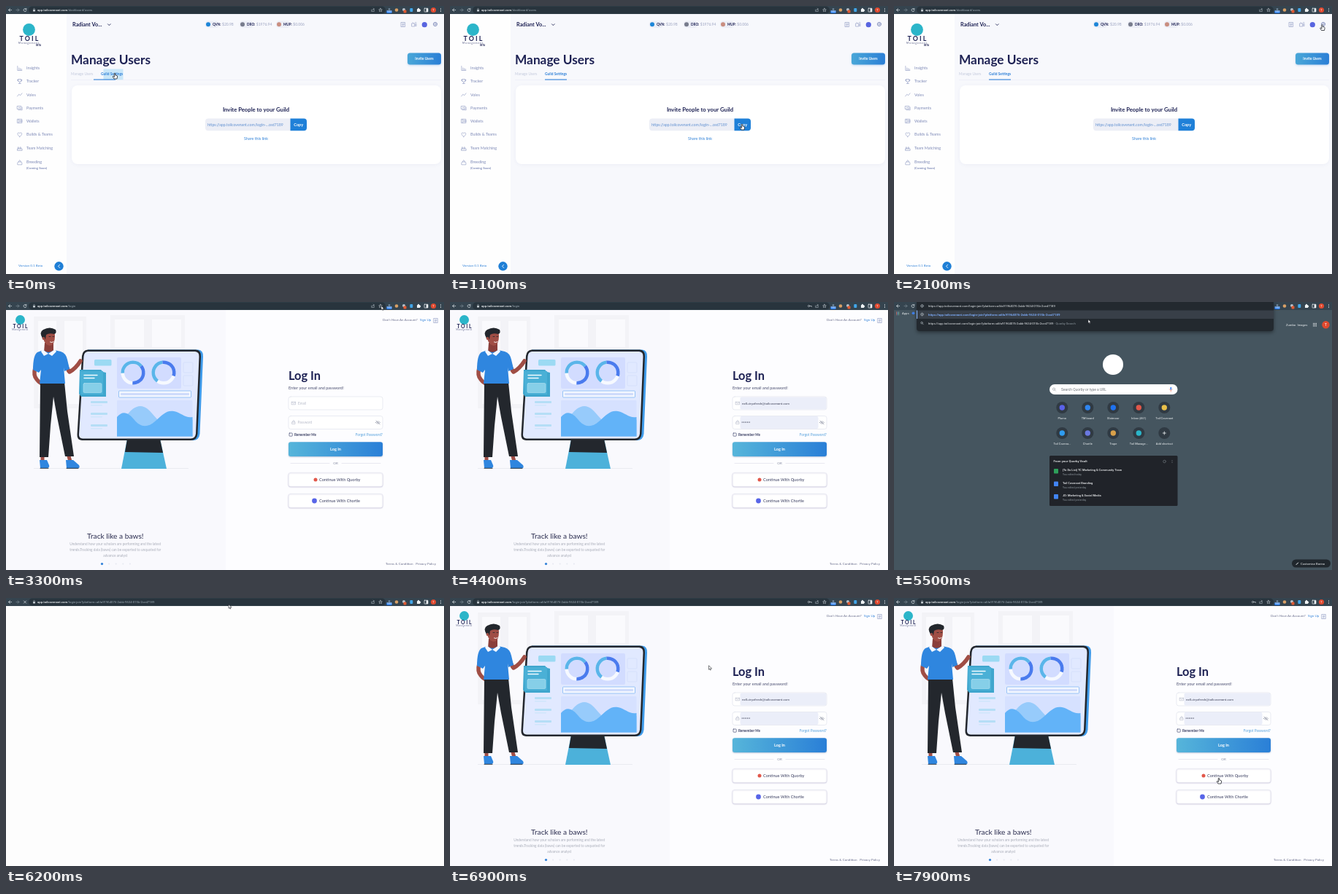
Write an HTML page with a canvas that moves like this. It is 600 px wide and 368 px high and loops after 8 s.

```html
<!DOCTYPE html>
<html lang="en">
<head>
<meta charset="utf-8">
<title>Guild invite walkthrough</title>
<style>
html, body { margin: 0; width: 100%; height: 100%; overflow: hidden; background: #fdfdff; }
canvas { display: block; width: 600px; height: 368px; }
</style>
</head>
<body>
<canvas id="stage"></canvas>
<script>
const LOOP = 8000;
const NAVY = '#1e2254', BLUE = '#2f80d8', MUTED = '#8a95c0', TEAL = '#2bb5c9';
const UI = 'Lato, sans-serif', SYS = 'Roboto, sans-serif';
const HOST = 'app.toilcovenant.com';
const JOIN = '/login-join?platform=a6fa91964076-2abb-9634-015b-2ced7189';
const cv = document.getElementById('stage');
const c = cv.getContext('2d');
const dpr = Math.max(1, window.devicePixelRatio || 1);
cv.width = 600 * dpr;
cv.height = 368 * dpr;

// ---- helpers ----
function box(x, y, w, h, r, fill, line, lw = 0.6) {
  c.beginPath();
  c.roundRect(x, y, w, h, r);
  if (fill) { c.fillStyle = fill; c.fill(); }
  if (line) { c.strokeStyle = line; c.lineWidth = lw; c.stroke(); }
}
function dot(x, y, r, fill, line, lw = 0.6) {
  c.beginPath();
  c.arc(x, y, r, 0, 7);
  if (fill) { c.fillStyle = fill; c.fill(); }
  if (line) { c.strokeStyle = line; c.lineWidth = lw; c.stroke(); }
}
function shape(d, fill) { c.fillStyle = fill; c.fill(new Path2D(d)); }
function line(d, color, lw = 0.7) {
  c.strokeStyle = color;
  c.lineWidth = lw;
  c.lineCap = c.lineJoin = 'round';
  c.stroke(new Path2D(d));
}
function icon(d, x, y, color, lw) {
  c.save();
  c.translate(x, y);
  line(d, color, lw);
  c.restore();
}
function text(s, x, y, size, color, weight = 400, align = 'left', font = UI) {
  c.font = `${weight} ${size}px ${font}`;
  c.fillStyle = color;
  c.textAlign = align;
  c.textBaseline = 'middle';
  c.fillText(s, x, y);
  return c.measureText(s).width;
}
const sys = (s, x, y, size, color, weight, align) => text(s, x, y, size, color, weight, align, SYS);
function gradient(x0, x1, a, b) {
  const g = c.createLinearGradient(x0, 0, x1, 0);
  g.addColorStop(0, a);
  g.addColorStop(1, b);
  return g;
}
function shadowed(color, blur, dy, draw) {
  c.save();
  c.shadowColor = color;
  c.shadowBlur = blur * dpr;
  c.shadowOffsetY = dy * dpr;
  draw();
  c.restore();
}
const clamp = v => Math.min(1, Math.max(0, v));
const ease = v => v * v * (3 - 2 * v);

// ---- icons, centred on 0,0 ----
const DOC = 'M-2.6-3H2.6V3H-2.6ZM-1.2-1.2H1.2M-1.2 .2H1.2M-1.2 1.5H.5';
const SIDE = [
  ['Insights', 85.5, 'M-3-3V3H3M-1 2V-.5M.8 2V.3M2.5 2V1'],
  ['Tracker', 103.5, 'M-2-3H2V-.5Q0 2.5-2-.5ZM-2-2H-3.2Q-3 0-1.6 0M2-2H3.2Q3 0 1.6 0M0 1V3M-1.5 3H1.5'],
  ['Voles', 122, 'M-3.2 2L-1-.8L.8 .8L3.2-2.2'],
  ['Payments', 140, 'M-3.2-2.5H2V1.5H-3.2ZM-2 2.8H3.3V-1M-1.5-.5H.5'],
  ['Wallets', 158, 'M-3-2.6H3V2.6H-3ZM.5-.8H3V.8H.5ZM-1.5-2.6V2.6'],
  ['Builds & Teams', 176.5, 'M0 3C-5-.5-2.6-4 0-1.8C2.6-4 5-.5 0 3Z'],
  ['Team Matching', 195.5, 'M-3.3 2.5V.6H3.3V2.5ZM-2-1.6A1 1 0 1 0-1.9-1.6M1-1.6A1 1 0 1 0 1.1-1.6'],
  ['Breeding', 214.5, 'M-3 3V1Q-3-.5-1-.5H1Q3-.5 3 1V3ZM-1.5-.5Q0-5.5 1.5-.5']
];

// ---- browser bar ----
function toolbar(path, opts) {
  box(0, 0, 600, 11, 0, '#35444f');
  box(31, 0.5, 489, 10, 5, '#28343d');
  const pale = '#dfe5ea';
  icon('M2 0H-2L0-2M-2 0L0 2', 5.5, 5.5, pale);
  icon('M-2 0H2L0-2M2 0L0 2', 16, 5.5, '#7c8a94');
  icon(opts.loading ? 'M-1.6-1.6L1.6 1.6M1.6-1.6L-1.6 1.6' : 'M1.6-1.2A2 2 0 1 0 2 .5M1.9-2.2V-.9H.6', 26, 5.5, pale);
  if (path) {
    box(37, 5, 3, 2.4, 0.4, '#c4ccd2');
    line('M37.6 5V4.3A.9 .9 0 0 1 39.4 4.3V5', '#c4ccd2', 0.5);
    const w = sys(HOST, 43, 5.8, 4.25, '#f2f5f7', 500);
    sys(path, 43 + w, 5.8, 4.25, '#9eabb4');
  }
  if (opts.key) { dot(491.5, 5.5, 1.1, null, pale); line('M492.6 5.5H495.3V6.5', pale, 0.6); }
  icon('M-1.8-.5V2H1.8V-.5M-.8 .5Q-.5-1.4 1.8-1.4L.7-2.5M1.8-1.4L.7-.4', 502.5, 5.5, '#b8c2ca', 0.5);
  icon('M0-2.3L.7-.7L2.3-.6L1.1 .5L1.5 2.1L0 1.2L-1.5 2.1L-1.1 .5L-2.3-.6L-.7-.7Z', 513, 5.5, '#dfe5ea', 0.5);
  dot(525, 4.5, 1.4, '#6c8398');
  box(521.3, 6.2, 7.4, 3.8, 1, '#1a73e8');
  sys('1883', 525, 8.3, 3, '#fff', 500, 'center');
  dot(535, 5.5, 2.3, '#d9a066');
  dot(545, 5, 2, '#b9c3cc');
  box(544.5, 5.5, 4, 4, 1, '#e05a33');
  box(553.3, 3, 4, 5, 1, '#42a5e8');
  box(563, 4, 4.2, 4, 0.6, '#eef2f4');
  dot(565, 3.8, 1, '#eef2f4');
  dot(567.3, 6, 0.9, '#eef2f4');
  box(573, 3.2, 5, 4.8, 0.5, null, '#eef2f4', 0.7);
  box(575.7, 3.2, 2.3, 4.8, 0, '#eef2f4');
  dot(585.5, 5.5, 3.6, '#e0492f');
  sys('T', 585.5, 5.8, 4, '#fff', 400, 'center');
  for (let i = -1; i < 2; i++) dot(595.5, 5.5 + i * 1.9, 0.55, pale);
}

function brand(x, y, k, beta) {
  dot(x, y, 8.4 * k, TEAL);
  c.save();
  c.letterSpacing = 2.2 * k + 'px';
  text('TOIL', x + k, y + 12.4 * k, 8.8 * k, NAVY, 700, 'center');
  c.letterSpacing = 0.8 * k + 'px';
  text('Management', x, y + 18 * k, 3.7 * k, '#5a6088', 400, 'center');
  c.restore();
  if (beta) text('BETA', 48, y + 21.5, 2.9, NAVY, 700, 'right');
}

// ---- guild settings page ----
function guildPage(t) {
  box(0, 11, 600, 357, 0, '#f7f8fc');
  box(0, 11, 83, 357, 0, '#fefefe');
  brand(31.5, 32.5, 1, true);
  for (const [label, y, d] of SIDE) {
    icon(d, 18.8, y, MUTED, 0.6);
    text(label, 28, y + 0.3, 5.4, '#7f8bb8');
  }
  text('(Coming Soon)', 28, 222.3, 4.4, '#7f8bb8', 700);
  text('Version 0.1 Beta', 17, 357, 4.6, BLUE);
  dot(72.5, 357.3, 6.2, '#1f7fd6');
  line('M73.6 355.2L71.5 357.3L73.6 359.4', '#fff', 0.9);

  text('Radiant Vo...', 91, 25.3, 7.3, NAVY, 700);
  line('M139.5 24.8L141.3 26.6L143.1 24.8', NAVY, 0.9);
  const coins = [[277, 'QVN:', '$20.98', '#1d86d8'], [324, 'DRO:', '$1976.94', '#777c8c'], [374, 'MUP:', '$0.006', '#c98e80']];
  for (const [x, name, price, tone] of coins) {
    box(x - 4.5, 20.5, 20, 9.5, 4.7, '#eceef6');
    dot(x, 25.2, 3, tone);
    const w = text(name, x + 6, 25.4, 4.6, NAVY, 700);
    text(price, x + 7.5 + w, 25.4, 5, '#9aa2c0');
  }
  icon(DOC, 544, 25.5, MUTED, 0.6);
  icon('M-3-1.5H1V2.5H-3ZM1 0L3-1.2V2.2L1 1.2M-2-3L-.8-1.8M1.5-2.8H3', 559, 25.5, MUTED, 0.6);
  dot(573.3, 25.7, 3.6, '#5865e0');
  dot(588, 25, 1.1, null, MUTED, 0.7);
  dot(588, 25, 2.6, null, MUTED, 1);

  text('Manage Users', 89, 75.2, 17.3, NAVY, 700);
  shadowed('rgba(60,130,210,.3)', 3, 1, () => box(550, 64.5, 46, 16, 3.5, gradient(550, 596, '#49a7d8', '#2b7fd6')));
  text('Invite Users', 573, 72.8, 4.8, '#fff', 700, 'center');
  const glow = 1 - clamp((t - 100) / 350);
  if (glow > 0) {
    c.globalAlpha = glow;
    box(133.5, 86.5, 27, 15, 0, '#c9e6f8');
    c.globalAlpha = 1;
  }
  text('Manage Users', 89, 93.8, 4.9, '#c3c9dc');
  text('Guild Settings', 130, 93.8, 4.9, BLUE, 700);
  box(89, 101.2, 507, 0.5, 0, '#e9ecf5');
  box(120 + 10 * ease(clamp(t / 200)), 100.5, 30, 1.1, 0, BLUE);

  shadowed('rgba(70,90,160,.06)', 5, 1, () => box(90, 109, 506, 108, 8, '#fff'));
  text('Invite People to your Guild', 342.5, 143, 7.7, NAVY, 700, 'center');
  box(273, 154.5, 120, 16.7, 4, '#eceef6');
  text('https://' + HOST + '/login-...ced7189', 276, 163, 5.2, '#5f8fd0');
  box(389.5, 154.5, 22.5, 16.7, [0, 4, 4, 0], '#1f80d8');
  text('Copy', 400.7, 163, 5.5, '#fff', 700, 'center');
  text('Share this link', 342.5, 182.3, 5.4, BLUE, 400, 'center');
}

// ---- login page ----
// ring with a light blue part a..b, a blue part b..d, and white for the rest
function donut(x, y, a, b, d) {
  c.lineCap = 'butt';
  c.lineWidth = 4.6;
  for (const [from, to, tone] of [[0, 6.283, '#f6f9ff'], [a, b, '#5ab5ea'], [b, d, '#4a7bee']]) {
    c.beginPath();
    c.arc(x, y, 14.3, from, to);
    c.strokeStyle = tone;
    c.stroke();
  }
}

function artwork() {
  const skin = '#a04e45', dark = '#23272d', shirt = '#2f86df';
  // wall
  for (const [x, y, w, h] of [[38, 20, 72, 126], [143, 18, 102, 50]]) {
    box(x, y, w, h, 0, '#f3f3f7');
    for (const k of [0, 1]) box(x + 6 + k * w / 2, y + 6, w / 2 - 11, h - 12, 0, '#fafafd');
  }
  box(38, 228.3, 212, 0.8, 0, '#e6e7ee');

  // stand
  shape('M166 188H211L220 229H158Z', '#4cb1da');
  shape('M166 188H211L215 207L163 206Z', dark);
  // monitor
  shape('M112 65.5H263Q270.5 66 270 75L265.5 181Q264.5 190 256 190H106Z', '#3f9bea');
  shape('M112 65.5H260Q267.5 66 267 75L262.5 181Q261.5 190 253 190H104Q97 189.500 97.500 182L104 74Q105 66 112 65.5Z', dark);
  shape('M112 68H259Q264.8 68.500 264.500 75L260 181Q259 187.500 253 187.500H105Q99.700 187 100 182L106.500 75Q107 68.500 112 68Z', '#e1e9ff');
  box(121, 79, 23.5, 8.5, 1.5, '#9bdaf3');
  for (const y of [136, 152, 168]) {
    box(116, y, 23, 3, 1, '#b5def6');
    box(116, y + 5, 16, 1.5, 0.7, '#cfe6fb');
  }
  box(152, 76, 88, 43, 2, '#d2dcff');
  donut(174, 97, 3.1, 5.6, 7.9);
  donut(216, 97, 2.2, 4.6, 6.6);
  box(243, 83, 13, 14, 1.5, null, '#cdd8f8');
  box(243, 101, 13, 14, 1.5, null, '#cdd8f8');
  box(154.5, 122, 99, 9, 1, '#f3f7ff', '#8fbff5', 0.9);
  box(157, 125, 94, 3, 1, '#cfdcfb');
  box(152, 135, 103.5, 49.5, 1, '#d6e1ff');
  shape('M152 168C162 164 170 143 184 143S204 164 216 166S242 152 255.500 162V184.500H152Z', '#97cbfb');
  shape('M152 158C160 148 168 152 176 162S194 173 204 164S220 148 230 150S246 160 255.500 158V184.500H152Z', '#62b3f8');

  // man
  line('M42 84Q37 97 40 103Q44 110 49 112', skin, 5.5);
  line('M50 208V218M85 208L88 219', skin, 5);
  shape('M46 217H56L59 224Q60 227 57 228H47Z', shirt);
  shape('M82 217H92L100 224Q102 228 98 228.500H83Z', shirt);
  line('M47 228.300H58M83 228.300H99', dark, 0.9);
  shape('M47 110H80L84 150L93 212H81L70 158L65 130L61 170L58 213H46Z', dark);
  line('M81 82Q84 93 87 96Q95 92 102 81', skin, 5.5);
  shape('M53 56H65V69H52Z', '#8a3f3a');
  shape('M51 66Q58 72 66 66L75 68Q82 70 84 79L87 92L80 95L79 90L81 112H46L48 93L45 97L37 93Q37 73 43 69Z', shirt);
  shape('M50 65L58 71L67 65L69 68L63 74L58 71L52 74L48 68Z', '#f6f9ff');
  shape('M51 43Q52 39 60 39Q67 39 67 47Q67 59 60 60Q53 59 51 50Z', skin);
  shape('M50 50Q45 41 51 38Q60 33 68 38Q70 43 66 44Q59 42 55 45L54 51Z', dark);
  dot(51.500, 50, 1.9, skin);
  line('M59 47.500H61M64 47.500H65.500', dark, 0.8);
  line('M60.500 55Q63.500 56.500 65 54.500', '#fff', 0.9);

  // folder
  shape('M101 93L130 93L133 96L137 97V130H103L100 126Z', '#3fa6cd');
  shape('M101 95H133V127H103Z', '#4ab0d6');
  line('M107 100.500H125M107 104.500H121', '#f2fbff', 1.4);
  box(106, 111.500, 25, 13, 1.5, '#86cfe8', '#b5e2f2', 0.6);
}

function loginPage(filled) {
  box(0, 11, 600, 357, 0, '#fdfdff');
  box(0, 11, 301, 357, 0, '#f9f9fd');
  brand(19.5, 24.5, 0.77, false);
  artwork();
  text('Track like a baws!', 149.8, 321.5, 10.2, '#2a2c4e', 400, 'center');
  const lines = ['Understand how your scholars are performing and the latest',
    'trends.Tracking data (baws) can be exported to unquoted for', 'advance analyst'];
  lines.forEach((s, i) => text(s, 149.8, 332.5 + i * 8.2, 4.75, '#a9adb9', 400, 'center'));
  for (let i = 0; i < 5; i++) dot(131.5 + i * 9.6, 359.6, i ? 1.1 : 1.6, i ? '#e8eaf2' : BLUE);

  text("Don't Have An Account?", 516, 25, 4.45, '#6a6e8c');
  text('Sign Up', 567, 25, 4.5, BLUE);
  icon(DOC, 588.7, 25.5, MUTED, 0.6);
  text('Log In', 387, 101.5, 16.4, NAVY, 700);
  text('Enter your email and password!', 387, 118.3, 5.5, '#4a4e70');

  for (const y of [130, 156.5]) {
    box(387, y, 129, 18, 3, '#fff', '#dcdfe9', 0.6);
    if (filled) box(397.5, y + 0.6, y < 150 ? 118 : 107, 16.8, 2, '#ebeef9');
  }
  icon('M-2.5-1.8H2.5V1.8H-2.5ZM-2.5-1.6L0 .4L2.5-1.6', 394, 139, '#a5abbe', 0.5);
  icon('M-2-.3H2V2.3H-2ZM-1.2-.3V-1.4A1.2 1.2 0 0 1 1.2-1.4V-.3', 394, 165.2, '#a5abbe', 0.5);
  icon('M-3 0Q0-3.4 3 0Q0 3.4-3 0ZM-2.6-2.6L2.6 2.6', 509.5, 165.5, '#7b8095', 0.5);
  dot(509.5, 165.5, 0.8, '#7b8095');
  if (filled) {
    text('nell+tryafresh@toilcovenant.com', 400, 139.2, 4.5, '#3a3e55');
    for (let i = 0; i < 8; i++) dot(400 + i * 1.5, 165, 0.55, '#3a3e55');
  } else {
    text('Email', 400, 139.2, 4.7, '#b8bcca');
    text('Password', 399.5, 165.5, 4.7, '#b8bcca');
  }
  box(388, 180, 4.2, 4.2, 0.5, '#fff', '#4a4f78', 0.7);
  text('Remember Me', 395, 182.5, 4.6, '#3c4164', 700);
  text('Forgot Password?', 516, 182.3, 4.8, '#55a0dc', 400, 'right');
  shadowed('rgba(40,80,140,.4)', 2, 0.8, () => box(387, 192.3, 129, 19.7, 3, gradient(387, 516, '#56b5da', '#2a7fd7')));
  text('Log In', 451.5, 202, 5.6, '#fff', 700, 'center');
  line('M390 221.5H443M460 221.5H513', '#d5d3e2', 0.5);
  text('OR', 451.5, 221.7, 4.5, '#8388a0', 400, 'center');
  const buttons = [[234.5, 'Quorby', 424, 2.5, '#e2574a'], [263.5, 'Chortle', 422.5, 3.4, '#5865e8']];
  for (const [y, name, x, r, tone] of buttons) {
    shadowed('rgba(60,50,120,.3)', 1.5, 0.6, () => box(387, y, 129, 19, 3, '#fff', '#e2e2ef', 0.4));
    dot(x, y + 9.5, r, tone);
    text('Continue With ' + name, 429, y + 9.6, 5.6, '#3a3e60');
  }
  text('Terms & Condition', 520, 359.5, 4.6, '#6a6e8c');
  text('Privacy Policy', 589, 359.5, 4.6, '#6a6e8c', 400, 'right');
}

// ---- new tab page ----
function newTab(pasted) {
  box(0, 0, 600, 368, 0, '#45555f');
  toolbar('', {});
  for (let i = 0; i < 9; i++) box(3 + i % 3 * 1.6, 13.5 + (i / 3 | 0) * 1.6, 1, 1, 0, ['#e8685a', '#6fb0f0', '#7fc48c'][i % 3]);
  sys('Apps', 11, 15.6, 4.2, '#eef2f4');
  dot(26.5, 15.3, 1.9, '#3f7fe8');
  sys('Zumbo', 537, 31.3, 4.2, '#f2f5f7');
  sys('Images', 552.5, 31.3, 4.2, '#f2f5f7');
  for (let i = 0; i < 9; i++) dot(574.6 + i % 3 * 1.9, 29.3 + (i / 3 | 0) * 1.9, 0.65, '#f2f5f7');
  dot(591.5, 31.2, 5.2, '#e0492f');
  sys('T', 591.5, 31.6, 5.5, '#fff', 400, 'center');

  dot(300, 86, 14, '#fff');
  box(213, 113, 175.5, 14, 7, '#fff');
  dot(219, 119.6, 1.6, null, '#8c9196', 0.6);
  line('M220.2 120.8L221.6 122.2', '#8c9196', 0.6);
  sys('Search Quorby or type a URL', 229, 120.2, 4.9, '#70757a');
  box(378.4, 116.8, 1.8, 3.8, 0.9, '#4285f4');
  line('M377.3 119.8Q379.3 123 381.3 119.8M379.3 121.5V123.2', '#e0573f', 0.5);

  const links = [['Plumo', '#5a62e8'], ['TM board', '#2f86f0'], ['Slotmoor', '#1f72f0'], ['Inbox (461)', '#e0574a'], ['Toil Covenant', '#e9c04a'],
    ['Toil Covena...', '#2f9cf0'], ['Chortle', '#6a78e0'], ['Trupe', '#d8a04a'], ['Toil Manage...', TEAL], ['Add shortcut', '']];
  links.forEach(([name, tone], i) => {
    const x = 230.3 + i % 5 * 35, y = 145 + (i > 4) * 35;
    dot(x, y, 8, '#303a43');
    if (tone) dot(x, y, 3.7, tone);
    else line(`M${x - 2} ${y}h4M${x} ${y - 2}v4`, '#f2f5f7', 0.8);
    sys(name, x, y + 15, 4, '#f2f5f7', 400, 'center');
  });

  box(213, 211, 175.5, 69, 1.5, '#202329');
  sys('From your Quorby Vault', 218.5, 219, 4.4, '#f0f2f4', 500);
  dot(370.5, 219, 1.8, null, '#8b949b', 0.5);
  for (let i = -1; i < 2; i++) dot(381, 219 + i * 1.5, 0.4, '#aab2b8');
  const files = [['[To Do List] TC Marketing & Community Team', 'today', '#2ea05a'],
    ['Toil Covenant Branding', 'yesterday', '#4285f4'], ['JD: Marketing & Social Media', 'yesterday', '#4285f4']];
  files.forEach(([name, day, tone], i) => {
    const y = 231 + i * 17.5;
    box(219, y - 2, 6, 6.5, 0.8, tone);
    sys(name, 231, y, 4, '#f0f2f4', 500);
    sys('You edited ' + day, 231, y + 6, 3.5, '#8f989f');
  });
  box(545, 353.5, 53, 11, 5.5, '#20272d');
  line('M551 360.6L553.6 358', '#f2f5f7', 1);
  sys('Customise Borino', 557, 359.3, 4.2, '#f2f5f7');

  if (!pasted) return;
  const url = 'https://' + HOST + JOIN;
  shadowed('rgba(0,0,0,.4)', 5, 2, () => box(31, 0, 489, 40, [0, 0, 4, 4], '#23292f'));
  box(31, 11.5, 489, 11.5, 0, '#383f48');
  box(31, 11.5, 1, 11.5, 0, '#8ab4f8');
  for (const y of [5.4, 17]) {
    dot(38.5, y, 1.9, null, '#b5bfc7', 0.5);
    line(`M36.6 ${y}h3.8M38.5 ${y - 1.9}v3.8`, '#b5bfc7', 0.4);
  }
  dot(38, 28.6, 1.3, null, '#b5bfc7', 0.6);
  line('M39 29.6L40.2 30.8', '#b5bfc7', 0.6);
  sys(url, 47, 5.8, 4.25, '#e8ecef');
  sys(url, 47, 17.3, 4.3, '#7ba9f5', 700);
  const w = sys(url, 47, 29.3, 4.2, '#e8ecef');
  sys(' - Quorby Search', 47 + w, 29.3, 4.2, '#8f99a1');
}

// ---- pointer ----
const TRACK = [[0, 149, 92], [250, 149, 92], [800, 400, 162], [1450, 400, 162], [2000, 586.5, 25.5], [2800, 586.5, 25.5],
  [3300, 514, 5.5], [3550, 508, -14], [4500, 250, -14], [4900, 258, 6], [5400, 266, 24], [5700, 266, 24],
  [6100, 305, 9], [6500, 305, 9], [7500, 445, 247], [8000, 445, 247]];
const HANDS = [[0, 350], [720, 1550], [1900, 2850], [7380, 8000]];

function pointer(t) {
  const i = Math.max(1, TRACK.findIndex(k => k[0] > t));
  const [t0, x0, y0] = TRACK[i - 1], [t1, x1, y1] = TRACK[i];
  const k = ease((t - t0) / (t1 - t0));
  const hand = HANDS.some(([a, b]) => t >= a && t < b);
  const p = new Path2D(hand
    ? 'M-.7 .6Q0-.5 .7 .6V3L3 3.5Q3.8 3.8 3.6 5L3 8H-1L-2.8 5Q-2.6 4-1.6 4.6L-.7 5.4Z'
    : 'M0 0V5.2L1.2 4.1L2 6L2.9 5.6L2.1 3.8H3.7Z');
  c.save();
  c.translate(x0 + (x1 - x0) * k, y0 + (y1 - y0) * k);
  c.fillStyle = '#fff';
  c.strokeStyle = '#22262c';
  c.lineWidth = hand ? 0.8 : 0.6;
  c.lineJoin = 'round';
  c.fill(p);
  c.stroke(p);
  c.restore();
}

function render(t) {
  c.setTransform(dpr, 0, 0, dpr, 0, 0);
  if (t < 2900) {
    guildPage(t);
    toolbar('/dashboard/users', {});
  } else if (t < 4500) {
    const filled = t >= 3700;
    loginPage(filled);
    toolbar('/login', { key: filled });
  } else if (t < 5700) {
    newTab(t >= 5000);
  } else if (t < 6500) {
    box(0, 11, 600, 357, 0, '#fdfdfd');
    toolbar(JOIN, { loading: true });
  } else {
    const filled = t >= 6900;
    loginPage(filled);
    toolbar(JOIN, { key: filled });
  }
  pointer(t);
}

const start = performance.now();
function tick(now) {
  render(Math.max(0, now - start) % LOOP);
  requestAnimationFrame(tick);
}
render(0);
requestAnimationFrame(tick);
</script>
</body>
</html>
```
